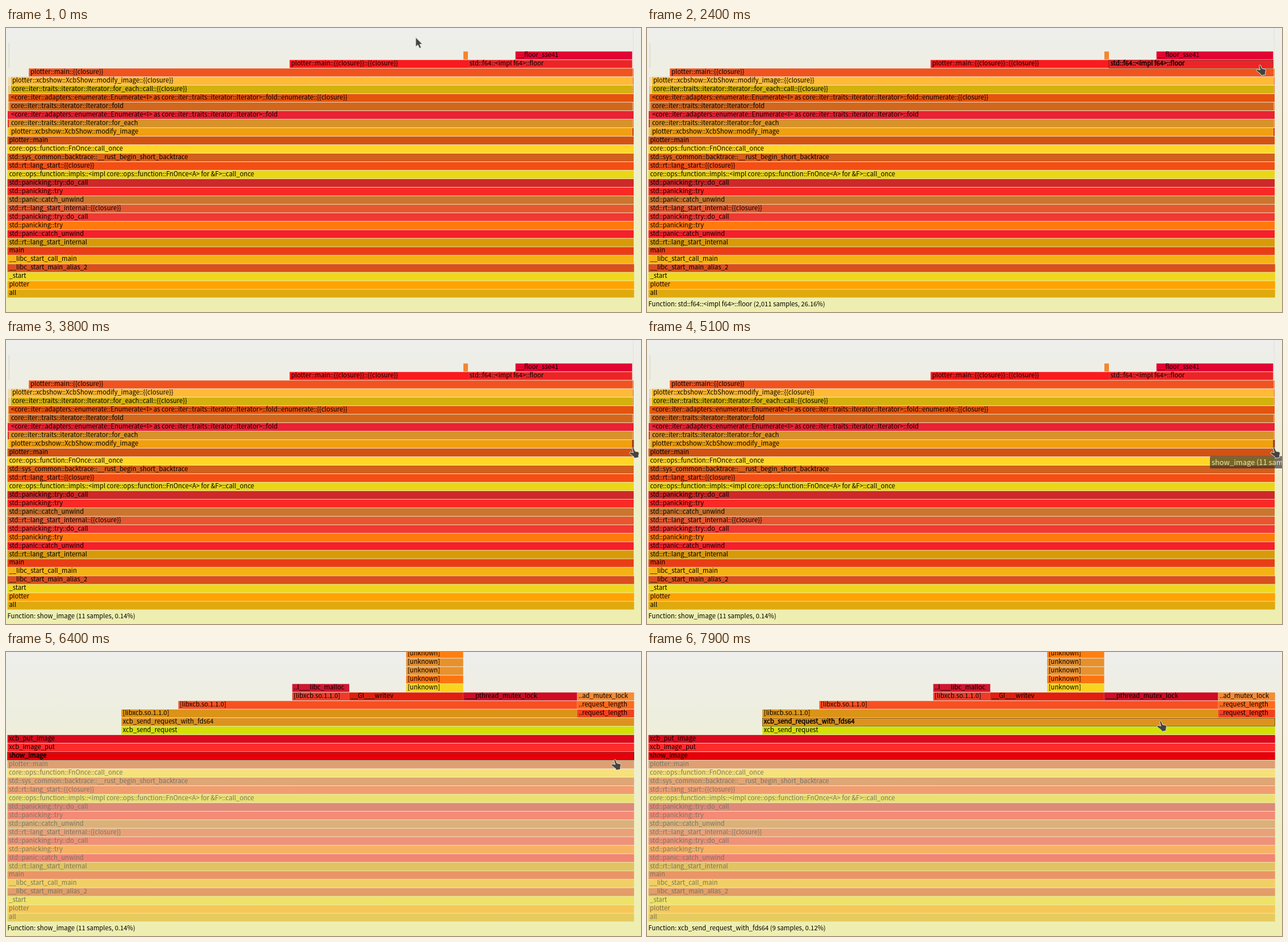
An HTML page for the animation above (8 s loop, 1119 by 500 pixels).

```html
<!DOCTYPE html>
<html lang="en">
<head>
<meta charset="utf-8">
<title>Flame graph</title>
<style>
  html, body { margin: 0; width: 100%; height: 100%; overflow: hidden; }
  svg { display: block; width: 1119px; height: 500px; }
  text { font: 11.25px "Noto Sans CJK JP", "Noto Sans CJK SC", "Noto Sans CJK KR", "Noto Sans CJK", "Noto Sans", sans-serif; white-space: pre; }
  .hover { stroke: #000; stroke-width: .47; }
  .parent { opacity: .5; }
  .cursor { stroke: #e2ded2; stroke-width: 1; stroke-linejoin: round; }
</style>
</head>
<body>
<svg id="stage" viewBox="0 0 1119 500">
  <defs>
    <linearGradient id="bg" gradientUnits="userSpaceOnUse" x1="0" y1="-13" x2="0" y2="478">
      <stop offset="0" stop-color="#eeeeee"/>
      <stop offset="1" stop-color="#eeeeb0"/>
    </linearGradient>
  </defs>
  <rect width="1119" height="500" fill="url(#bg)"/>
  <g id="full">
    <rect x="4.8" y="27" width=".8" height="44" fill="#cdc8b2"/>
    <rect x="1104.8" width=".8" height="71" fill="#dfdbd4"/>
  </g>
  <g id="zoomed"></g>
  <text id="status" x="2.6" y="490"></text>
  <g id="tip">
    <rect x="992" y="204.5" width="140" height="21.5" rx="2" fill="#2b2b2b"/>
    <text x="995" y="220" fill="#e8e8e0" style="font-size:12.9px">show_image (11 samples, 0.14%)</text>
  </g>
  <path id="arrow" class="cursor" fill="#444" d="M0 0V16.4L4 13.2L6.6 19.2L9.6 17.8L7.1 12.2L11.4 11.6Z"/>
  <path id="hand" class="cursor" fill="#444340" d="M-1.6 1.2Q-.3-1 1.3.6L3.6 6.4L9 7.4Q10.7 8 10.4 10L9.6 14.5L10 17L2.5 18.6L1.4 16L-5.6 10.6Q-7.2 8.4-5 7.7L.5 8.8Z"/>
</svg>
<script>
const $ = id => document.getElementById(id);
const LOOP = 8000, TICK = 100, ZOOM_AT = 5200;
const LEFT = 2.6, PITCH = 14.97, BAR = 14.04, BASE = 460.5, UNIT = 100.38;

// The common call stack, bottom up
const stack = [
  ["all", "#e0aa0f"],
  ["plotter", "#ffa303"],
  ["_start", "#f0d71b"],
  ["__libc_start_main_alias_2", "#d94f1d"],
  ["__libc_start_call_main", "#f4b216"],
  ["main", "#e93e15"],
  ["std::rt::lang_start_internal", "#d89a08"],
  ["std::panic::catch_unwind", "#f6202a"],
  ["std::panicking::try", "#ff7a0c"],
  ["std::panicking::try::do_call", "#f03932"],
  ["std::rt::lang_start_internal::{{closure}}", "#e8562f"],
  ["std::panic::catch_unwind", "#cc752f"],
  ["std::panicking::try", "#f92a25"],
  ["std::panicking::try::do_call", "#cf282a"],
  ["core::ops::function::impls::<impl core::ops::function::FnOnce<A> for &F>::call_once", "#ebd614"],
  ["std::rt::lang_start::{{closure}}", "#f54e14"],
  ["std::sys_common::backtrace::__rust_begin_short_backtrace", "#d2601f"],
  ["core::ops::function::FnOnce::call_once", "#ffd626"],
  ["plotter::main", "#d35212"]
];

// level, left, right, colour, label, details
const upper = [
  [19, 6.1, 1103.8, "#f0a010", "plotter::xcbshow::XcbShow::modify_image", "7,645 samples, 99.45%"],
  [20, 6.1, 1104, "#d6932b", "core::iter::traits::iterator::Iterator::for_each"],
  [21, 6.1, 1106, "#ea2233", "<core::iter::adapters::enumerate::Enumerate<I> as core::iter::traits::iterator::Iterator>::fold"],
  [22, 6.1, 1104, "#d2671c", "core::iter::traits::iterator::Iterator::fold"],
  [23, 5.9, 1106, "#e5540c", "<core::iter::adapters::enumerate::Enumerate<I> as core::iter::traits::iterator::Iterator>::fold::enumerate::{{closure}}"],
  [24, 8.1, 1104, "#d3b10f", "core::iter::traits::iterator::Iterator::for_each::call::{{closure}}"],
  [25, 8.1, 1104, "#ffbb36", "plotter::xcbshow::XcbShow::modify_image::{{closure}}"],
  [26, 40.3, 1104, "#f1531f", "plotter::main::{{closure}}"],
  [27, 499.8, 814, "#f91b1d", "plotter::main::{{closure}}::{{closure}}"],
  [27, 814, 1103.4, "#ec2427", "std::f64::<impl f64>::floor", "2,011 samples, 26.16%"],
  [28, 806, 814, "#f48630", ""],
  [28, 897.8, 1103.4, "#e20433", "__floor_sse41", "1,431 samples, 18.62%"],
  // slivers at both edges
  [19, 3, 5.5, "#ecc228", ""],
  [20, 3, 5.5, "#e0301c", ""],
  [21, 3, 6.2, "#ea2233", ""],
  [22, 3.8, 5.6, "#e89a34", ""],
  [23, 4.2, 5.9, "#e5640c", ""],
  [24, 4.6, 6.2, "#e8a53a", ""],
  [25, 4.8, 6, "#eebb66", ""],
  ...[20, 22, 24, 25, 26].map(k => [k, 1104.5, 1106, "#e8702a", ""])
];

// level, first sample, last sample, colour, label
const zoom = [
  [19, 0, 11, "#e50009", "show_image"],
  [20, 0, 11, "#fc2c2b", "xcb_image_put"],
  [21, 0, 11, "#dc0a1d", "xcb_put_image"],
  [22, 2, 11, "#d4e100", "xcb_send_request"],
  [23, 2, 11, "#dd9220", "xcb_send_request_with_fds64"],
  [24, 2, 10, "#db9318", "[libxcb.so.1.1.0]"],
  [24, 10, 11, "#f0421f", "..request_length"],
  [25, 3, 10, "#f85020", "[libxcb.so.1.1.0]"],
  [25, 10, 11, "#ff6a1d", "..request_length"],
  [26, 5, 6, "#ee3b28", "[libxcb.so.1.1.0]"],
  [26, 6, 8, "#e11f0c", "__GI___writev"],
  [26, 8, 10, "#d00c25", "___pthread_mutex_lock"],
  [26, 10, 11, "#f58b34", "..ad_mutex_lock"],
  [27, 5, 6, "#cd1830", "..l___libc_malloc"],
  ...["#fad41c", "#fc7511", "#e8912f", "#e8902a", "#ff7e10"].map((c, i) => [27 + i, 7, 8, c, "[unknown]"])
];

function el(parent, tag, attrs) {
  const node = document.createElementNS("http://www.w3.org/2000/svg", tag);
  for (const key in attrs) node.setAttribute(key, attrs[key]);
  return parent.appendChild(node);
}

function bar(parent, level, x0, x1, fill, label, info, cls = "", dx = 2.8) {
  const y = BASE - level * PITCH;
  const node = el(parent, "g", { class: cls });
  el(node, "rect", { x: x0, y, width: x1 - x0, height: BAR, fill });
  if (label) el(node, "text", { x: x0 + dx, y: y + 9.83 }).textContent = label;
  return { node, level, x0, x1, info };
}

const detail = (name, info) => info ? `Function: ${name} (${info})` : "";
const right = LEFT + 11 * UNIT;
const fullBars = [], zoomBars = [];
stack.forEach(([name, fill], k) => {
  fullBars.push(bar($("full"), k, LEFT, k < 4 ? right : 1106.1, fill, name));
  bar($("zoomed"), k, LEFT, right, fill, name, "", "parent", 2.5);
});
for (const [k, a, b, fill, name, info] of upper)
  fullBars.push(bar($("full"), k, a, b, fill, name, detail(name, info)));
fullBars.push(bar($("full"), 19, 1103.9, 1106, "#d8301a", "", detail("show_image", "11 samples, 0.14%")));
for (const [k, a, b, fill, name] of zoom) {
  const info = b - a === 11 ? "11 samples, 0.14%" : "9 samples, 0.12%";
  zoomBars.push(bar($("zoomed"), k, LEFT + a * UNIT, LEFT + b * UNIT, fill, name, detail(name, info), "", 2.5));
}

// Pointer hot spot: time, x, y
const path = [
  [0, 722, 16.5], [700, 722, 16.5], [800, 738, 26], [900, 775, 40], [1000, 825, 45],
  [1100, 875, 38], [1400, 1094, 21], [1500, 1094, 21], [2400, 1080, 65],
  [3200, 1080, 65], [3300, 1102, 184], [3500, 1102, 184], [3800, 1105, 189.6],
  [6300, 1105, 189.6], [6400, 1073, 189.4], [6800, 955, 150], [7100, 908, 133],
  [7700, 908, 133], [7800, 907, 127], [7900, 905, 121.5], [8000, 905, 121.5]
];

function pointer(t) {
  const i = path.findIndex(p => p[0] > t);
  const [t0, x0, y0] = path[i - 1], [t1, x1, y1] = path[i];
  const f = (t - t0) / (t1 - t0);
  return [x0 + (x1 - x0) * f, y0 + (y1 - y0) * f];
}

function tipOpacity(t) {
  if (t < 4400 || t >= 5400) return 0;
  return t < 5100 ? .75 : t < 5200 ? .64 : .12;
}

const show = (node, on) => node.setAttribute("visibility", on ? "visible" : "hidden");

let hovered = null;
function draw(t) {
  const isZoomed = t >= ZOOM_AT;
  const [x, y] = pointer(t);
  const level = Math.floor((BASE + PITCH - y) / PITCH);
  const hit = (isZoomed ? zoomBars : fullBars).find(b => b.level === level && x >= b.x0 && x < b.x1);
  if (hovered) hovered.node.removeAttribute("class");
  hovered = hit;
  if (hit) {
    hit.node.setAttribute("class", "hover");
    hit.node.parentNode.append(hit.node);
  }
  $("status").textContent = hit ? hit.info : "";
  show($("full"), !isZoomed);
  show($("zoomed"), isZoomed);
  $("tip").setAttribute("opacity", tipOpacity(t));
  show($("arrow"), !hit);
  show($("hand"), hit);
  $(hit ? "hand" : "arrow").setAttribute("transform", `translate(${x} ${y})`);
}

const start = performance.now();
let last = -1;
function tick() {
  const t = Math.floor((performance.now() - start) % LOOP / TICK) * TICK;
  if (t !== last) draw(last = t);
  requestAnimationFrame(tick);
}
tick();
</script>
</body>
</html>
```
